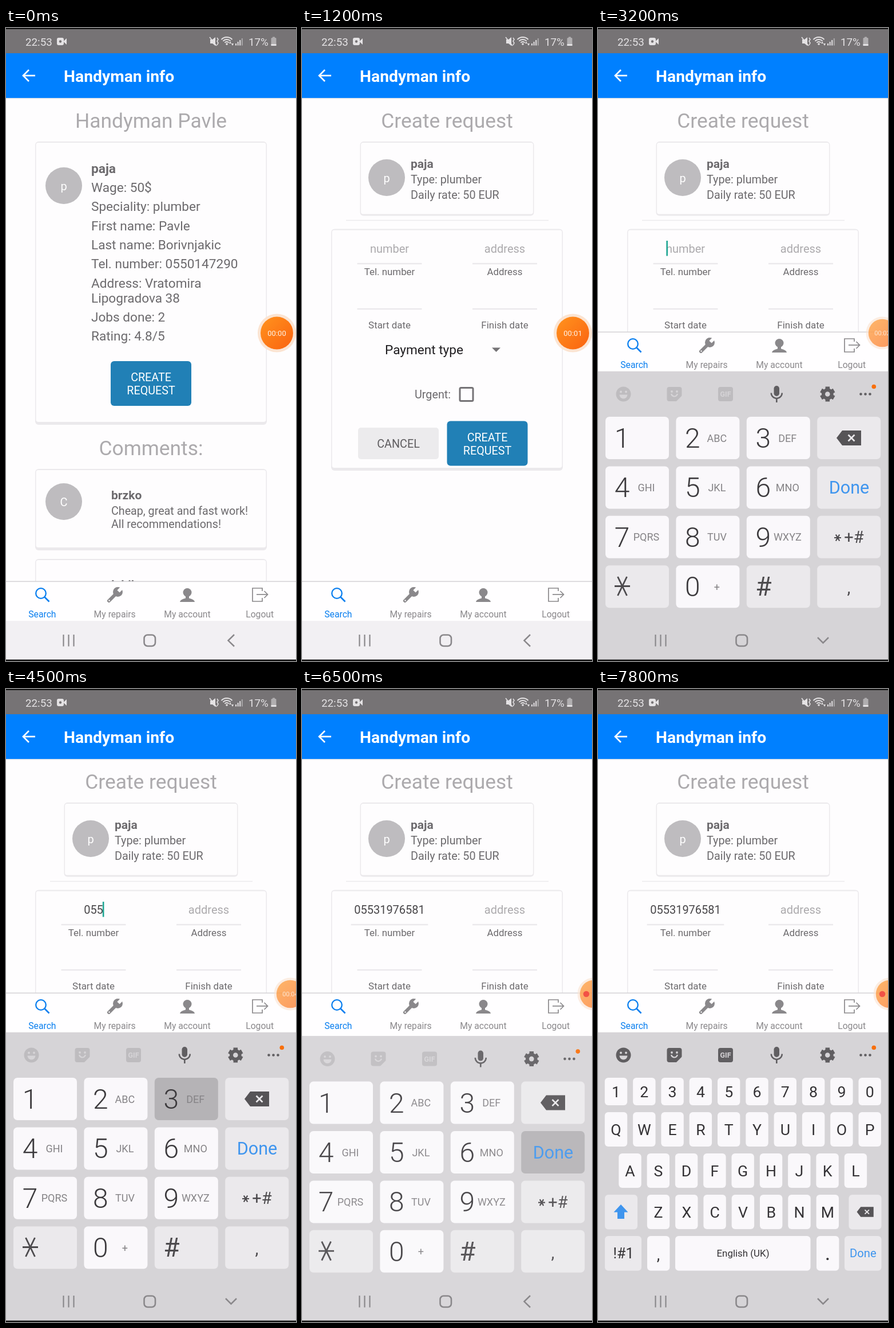
Animation of 507x1104 px, one loop 8000 ms. Source, as an HTML page with a canvas:

```html
<!DOCTYPE html>
<html lang="en">
<head>
<meta charset="utf-8">
<title>Handyman request</title>
<style>
html, body { margin: 0; width: 100%; height: 100%; overflow: hidden; background: #fefdfe; }
canvas { display: block; }
</style>
</head>
<body>
<canvas id="stage" width="507" height="1104"></canvas>
<script>
const ctx = document.getElementById('stage').getContext('2d');
const LOOP = 8000, PAGE = '#fefdfe', GREY = '#6c6a6d', PALE = '#acaaad', LINE = '#ebe9ec';
const ICON = '#8a888b', BLUE = '#0a7fef', KEYBG = '#d6d4d7', KEY = '#faf8fb', FKEY = '#ebe9ec', DOWN = '#b5b3b6';
const NUMBER = '05531976581';
// [press, release] for each digit of NUMBER
const PRESSES = [[3800, 3900], [4100, 4200], [4300, 4400], [4500, 4600], [4700, 4800], [5000, 5100],
  [5200, 5300], [5300, 5500], [5500, 5600], [5700, 5800], [5800, 5900]];
const TICKS = [1000, 2100, 3600, 4300, 5200, 5900];

const clamp = v => Math.max(0, Math.min(1, v));
const within = (t, a, b) => t >= a && t < b;

function text(s, x, y, size, color, align = 'left', weight = 400) {
  ctx.font = `${weight} ${size}px Roboto, sans-serif`;
  ctx.textAlign = align;
  ctx.fillStyle = color;
  ctx.fillText(s, x, y);
}
function rect(x, y, w, h, color) {
  ctx.fillStyle = color;
  ctx.fillRect(x, y, w, h);
}
function round(x, y, w, h, r, color) {
  ctx.beginPath();
  ctx.roundRect(x, y, w, h, r);
  ctx.fillStyle = color;
  ctx.fill();
}
function disc(x, y, r, color) {
  ctx.beginPath();
  ctx.arc(x, y, r, 0, Math.PI * 2);
  ctx.fillStyle = color;
  ctx.fill();
}
function arc(x, y, r, a, b, color, width) {
  ctx.beginPath();
  ctx.arc(x, y, r, a, b);
  ctx.strokeStyle = color;
  ctx.lineWidth = width;
  ctx.stroke();
}
function trace(p) {
  ctx.beginPath();
  for (let i = 0; i < p.length; i += 2) ctx.lineTo(p[i], p[i + 1]);
}
function line(p, color, width, cap = 'butt') {
  trace(p);
  ctx.strokeStyle = color;
  ctx.lineWidth = width;
  ctx.lineCap = cap;
  ctx.stroke();
  ctx.lineCap = 'butt';
}
function poly(p, color) {
  trace(p);
  ctx.fillStyle = color;
  ctx.fill();
}
function card(x, y, w, h, bottom = 5) {
  round(x, y, w, h, 6, LINE);
  round(x + 1.5, y + 2, w - 3, h - 2 - bottom, 4, PAGE);
}
function avatar(x, y, letter) {
  disc(x, y, 32, '#bebcbf');
  text(letter, x, y + 7.5, 20, '#fff', 'center');
}
function createButton(x, y, pressed) {
  round(x, y, 141, 78, 6, '#2180b6');
  if (pressed) round(x, y, 141, 78, 6, 'rgba(255,255,255,.2)');
  text('CREATE', x + 70.5, y + 35, 19.7, '#fff', 'center');
  text('REQUEST', x + 70.5, y + 58, 19.7, '#fff', 'center');
}

function statusBar() {
  const c = '#e4e2e4';
  rect(0, 0, 507, 44, '#767375');
  rect(0, 0, 507, 2, '#111');
  text('22:53', 34, 30.5, 18.8, c);
  round(89, 17, 12, 13, 3, c);
  poly([100, 23.5, 106, 18, 106, 29], c);
  disc(95, 23.5, 2.2, '#767375');
  poly([357, 20, 361, 20, 366, 16, 366, 31, 361, 27, 357, 27], c);
  line([356, 16, 368, 31], c, 1.6);
  line([369, 17, 371, 20, 369, 23, 371, 26, 369, 30], c, 1.5);
  for (const r of [5, 9, 13]) arc(386, 29, r, Math.PI * 1.24, Math.PI * 1.76, c, 1.8);
  disc(386, 28, 1.8, c);
  poly([390, 27, 392, 23.5, 394, 27], c);
  poly([394, 27, 398, 27, 396, 31], c);
  for (let i = 0; i < 4; i++) rect(401 + i * 3.6, 27 - i * 3, 2, 3.5 + i * 3, i < 3 ? c : '#aaa8aa');
  text('17%', 424, 30.5, 18.8, c);
  round(463.5, 17, 9, 14, 1.5, '#b0aeb0');
  rect(466, 15.5, 4, 2, '#b0aeb0');
  rect(463.5, 28, 9, 3, c);
}
function header() {
  rect(0, 43.5, 507, 78.5, '#0080ff');
  rect(0, 122, 507, 1.5, '#dfe3ea');
  line([51, 83, 30, 83], '#fff', 2.7);
  line([40, 73, 30, 83, 40, 93], '#fff', 2.7);
  text('Handyman info', 101, 94, 28.3, '#fff', 'left', 700);
}

function infoPage(t) {
  text('Handyman Pavle', 253.5, 174, 35.4, PALE, 'center');
  card(51, 198, 405, 494);
  avatar(101, 275, 'p');
  text('paja', 149, 253, 22.7, GREY, 'left', 700);
  const rows = ['Wage: 50$', 'Speciality: plumber', 'First name: Pavle', 'Last name: Borivnjakic',
    'Tel. number: 0550147290', 'Address: Vratomira', 'Lipogradova 38', 'Jobs done: 2', 'Rating: 4.8/5'];
  rows.forEach((s, i) => text(s, 149, 286 + i * 33.3 - (i > 5 ? 7 : 0), 22.6, GREY));
  createButton(183, 581, t >= 600);
  text('Comments:', 253.5, 745, 35.4, PALE, 'center');
  card(51, 769, 405, 142);
  avatar(101, 826, 'C');
  text('brzko', 184, 822, 21, GREY, 'left', 700);
  text('Cheap, great and fast work!', 184, 849, 19.7, GREY);
  text('All recommendations!', 184, 872, 19.7, GREY);
  card(51, 926, 405, 142);
  text('lubik', 184, 978, 21, GREY, 'left', 700);
}

function field(x, value, hint, label, cursor) {
  const size = 20;
  text(value || hint, x, 391.5, size, value ? '#474548' : PALE, 'center');
  const w = ctx.measureText(value || hint).width;
  const half = Math.max(113, value ? w + 11 : 0) / 2;
  line([x - half, 411, x + half, 411], LINE, 2.5);
  if (cursor) rect(value ? x + w / 2 - 1 : x - w / 2 + .5, 371, 2.6, 26.5, '#1fa794');
  text(label, x, 431, 16.9, GREY, 'center');
}
function formPage(t) {
  text('Create request', 253.5, 174, 35.4, PALE, 'center');
  card(101.5, 198, 304, 129.5, 3);
  avatar(148, 261, 'p');
  text('paja', 190, 244, 21, GREY, 'left', 700);
  text('Type: plumber', 190, 271, 19.8, GREY);
  text('Daily rate: 50 EUR', 190, 298, 19.8, GREY);
  line([77, 335.5, 431, 335.5], LINE, 1.6);
  card(51, 350.5, 405, 421.5);
  const typed = PRESSES.filter(p => t >= p[1]).length;
  const caret = within(t, 2200, 2700) || within(t, 3200, 6300);
  field(153, NUMBER.slice(0, typed), 'number', 'Tel. number', caret);
  field(354.5, '', 'address', 'Address', within(t, 7300, 7800));
  for (const [x, s] of [[153, 'Start date'], [354.5, 'Finish date']]) {
    line([x - 56.5, 490, x + 56.5, 490], LINE, 2.5);
    text(s, x, 524, 16.9, GREY, 'center');
  }
  text('Payment type', 145, 569, 22.6, '#1f1d20');
  poly([332, 557.5, 347, 557.5, 339.5, 565], '#757376');
  text('Urgent:', 197, 646, 19.8, GREY);
  ctx.strokeStyle = '#757376';
  ctx.lineWidth = 3;
  ctx.beginPath();
  ctx.roundRect(276, 627.5, 23, 23, 2);
  ctx.stroke();
  round(98, 697, 141, 55, 5, '#ecebed');
  text('CANCEL', 168.5, 732, 19.8, '#5e5c5f', 'center');
  createButton(253.5, 685.5, false);
}

function tabs(shift) {
  ctx.save();
  ctx.translate(0, -shift);
  rect(0, 965, 507, 69, '#fffeff');
  rect(0, 964.5, 507, 1.6, '#d6d4d7');
  arc(61, 986, 8.8, 0, 7, BLUE, 2.3);
  line([67.5, 992.5, 75.5, 1000.5], BLUE, 2.6);
  line([180, 999, 195, 984], ICON, 6, 'round');
  disc(195.5, 983.5, 8.5, ICON);
  line([196.5, 982.5, 206, 973], '#fffeff', 6);
  disc(180.5, 998.5, 1.2, '#fffeff');
  ctx.beginPath();
  ctx.ellipse(317, 984.5, 7.6, 9.5, 0, 0, 7);
  ctx.fill();
  ctx.beginPath();
  ctx.moveTo(304, 1001);
  ctx.quadraticCurveTo(304.5, 996.5, 314, 994.5);
  ctx.lineTo(314, 988);
  ctx.lineTo(320, 988);
  ctx.lineTo(320, 994.5);
  ctx.quadraticCurveTo(329.5, 996.5, 330, 1001);
  ctx.fillStyle = ICON;
  ctx.fill();
  disc(317, 984.5, 7.5, ICON);
  line([448, 982, 448, 977, 431, 977, 431, 1000, 448, 1000, 448, 994], ICON, 1.7);
  line([438, 988, 457, 988], ICON, 1.7);
  line([451.5, 982, 457.5, 988, 451.5, 994], ICON, 1.7);
  ['Search', 'My repairs', 'My account', 'Logout'].forEach((s, i) =>
    text(s, 63.4 + i * 126.75, 1027.5, 15.7, i ? ICON : BLUE, 'center'));
  ctx.restore();
}
function navIcons(chevron) {
  for (const x of [100.5, 109.5, 118.5]) line([x, 1058, x, 1078.5], ICON, 2.2);
  ctx.beginPath();
  ctx.roundRect(241.5, 1058.5, 19.5, 19.5, 6);
  ctx.lineWidth = 2.6;
  ctx.stroke();
  line(chevron ? [384, 1063, 393.5, 1072.5, 403, 1063] : [399, 1058, 388.5, 1068.3, 399, 1078.5], ICON, 2.5);
}

function backspace(x, y, s, bg) {
  const p = [-22, 0, -12, -13, 21, -13, 21, 13, -12, 13].map((v, i) => v * s + (i % 2 ? y : x));
  poly(p, '#565457');
  const d = 5.5 * s, cx = x + 4 * s;
  line([cx - d, y - d, cx + d, y + d], bg, 2.6 * s);
  line([cx - d, y + d, cx + d, y - d], bg, 2.6 * s);
}
function toolbar(full) {
  const dark = '#605e61', c = full ? dark : '#bebcbf', y = 638.5;
  disc(44.5, y, 13, c);
  disc(40, y - 4, 1.9, KEYBG);
  disc(49, y - 4, 1.9, KEYBG);
  ctx.beginPath();
  ctx.arc(44.5, y + 1, 7, 0, Math.PI);
  ctx.fillStyle = KEYBG;
  ctx.fill();
  round(120.5, 626, 26, 25, 4, c);
  disc(129, 634, 1.9, KEYBG);
  disc(138, 634, 1.9, KEYBG);
  arc(133.5, 637, 5.5, .2, Math.PI - .2, KEYBG, 2.2);
  poly([147, 641, 147, 652, 136, 652], KEYBG);
  poly([146, 641.5, 138, 641.5, 137, 650], c);
  round(210, 626, 26, 25, 4, c);
  text('GIF', 223, 643, 12.5, KEYBG, 'center', 700);
  round(307.5, 624, 9.5, 18, 4.7, dark);
  arc(312.3, 636.5, 9.5, 0, Math.PI, dark, 2.5);
  line([312.3, 646, 312.3, 653], dark, 2.6);
  for (let i = 0; i < 6; i++) {
    const a = Math.PI * (i / 3 + 1 / 6);
    line([401.3, y, 401.3 + 13 * Math.cos(a), y + 13 * Math.sin(a)], dark, 7.5);
  }
  disc(401.3, y, 10.3, dark);
  disc(401.3, y, 4.3, KEYBG);
  for (const x of [459.5, 467.5, 475.5]) disc(x, y, 2.3, dark);
  disc(482.3, 625.5, 3.8, '#f86f0a');
}
function numberPad(held) {
  const letters = ['', 'ABC', 'DEF', 'GHI', 'JKL', 'MNO', 'PQRS', 'TUV', 'WXYZ'];
  for (let r = 0; r < 4; r++) for (let c = 0; c < 4; c++) {
    const x = 13 + c * 123.4, y = 678 + r * 86.4;
    const label = c === 3 ? ['back', 'Done', '*+#', ','][r] : r === 3 ? '*0#'[c] : String(r * 3 + c + 1);
    const plain = c < 3 && (r < 3 || c === 1);
    const bg = held === label ? DOWN : plain ? KEY : FKEY;
    round(x, y, 111, 74, 7, bg);
    if (plain) {
      text(label, x + 29, y + 54, 48, '#3c3a3d', 'center', 300);
      text(label === '0' ? '+' : letters[r * 3 + c], x + 71.5, y + 43.5, 18, '#858386', 'center');
    }
  }
  backspace(439, 715, 1, FKEY);
  text('Done', 439, 812, 30.6, '#3f95ee', 'center');
  const ink = '#4c4a4d';
  line([419 - 6, 889, 419 + 6, 889], ink, 2.2);
  for (const s of [-1, 1]) line([419 - s * 3.2, 883.5, 419 + s * 3.2, 894.5], ink, 2.2);
  text('+#', 447.5, 898, 29, ink, 'center');
  text(',', 438.5, 986, 30, ink, 'center');
  line([29, 973.5, 56, 973.5], ink, 2.8);
  for (const s of [-1, 1]) line([42.5 - s * 8, 957, 42.5 + s * 8, 990], ink, 2.8);
  text('#', 289.5, 990, 46, ink, 'center');
}
function letterPad() {
  const ink = '#343235';
  const rows = [['1234567890', 31.5, 678, 48], ['QWERTYUIOP', 31.5, 738, 60], ['ASDFGHJKL', 56, 810, 60], ['ZXCVBNM', 105.5, 882, 60]];
  for (const [keys, x0, y, h] of rows) [...keys].forEach((k, i) => {
    const x = x0 + i * 49.3;
    round(x - 19.7, y, 39.4, h, 6, KEY);
    text(k, x, y + h / 2 + 9.5, 26.7, ink, 'center');
  });
  const wide = [[12, 882, 57, FKEY], [438.5, 882, 57, FKEY], [12, 954, 64, FKEY], [86, 954, 39.4, KEY],
    [135, 954, 236.5, KEY], [382, 954, 39.4, KEY], [431, 954, 64.5, FKEY]];
  for (const [x, y, w, c] of wide) round(x, y, w, 60.5, 6, c);
  poly([40, 899, 52.5, 912.5, 46, 912.5, 46, 924, 34, 924, 34, 912.5, 27.5, 912.5], '#3f95ee');
  backspace(467.5, 912, .68, FKEY);
  text('!#1', 44.5, 993, 25, ink, 'center');
  text(',', 105.5, 996, 28, ink, 'center');
  text('.', 401.5, 996, 30, ink, 'center', 500);
  text('English (UK)', 253.5, 990, 16.9, ink, 'center');
  text('Done', 463.3, 991, 20.2, '#3f95ee', 'center');
}
// hidden runs from 0 (fully up) to 1 (gone)
function keyboard(hidden, t) {
  const top = 598.5, off = 430 * Math.pow(hidden, 3.8);
  ctx.save();
  ctx.beginPath();
  ctx.rect(0, top, 507, 503);
  ctx.clip();
  ctx.translate(0, off);
  rect(0, top, 507, 510, KEYBG);
  toolbar(t > 7000);
  if (t > 7000) letterPad();
  else {
    const i = PRESSES.findIndex(p => within(t, p[0], p[1]));
    numberPad(within(t, 6300, 6700) ? 'Done' : NUMBER[i]);
  }
  rect(0, top, 507, 510, `rgba(255,255,255,${Math.pow(hidden, 2.4)})`);
  ctx.restore();
}

function badge(t) {
  const ease = p => 1 - Math.pow(1 - clamp(p), 3);
  const dock = ease((t - 1500) / 500), tuck = ease((t - 6200) / 300);
  ctx.save();
  ctx.translate(473.5 + 23.5 * dock + 13 * tuck, 532);
  ctx.scale(1 - .15 * dock, 1 - .15 * dock);
  ctx.globalAlpha = 1 - .38 * dock;
  disc(0, 0, 33.5, '#fbe4d2');
  const g = ctx.createLinearGradient(-20, -20, 20, 20);
  g.addColorStop(0, '#ff8c1c');
  g.addColorStop(1, '#fb6a12');
  disc(0, 0, 28.5, g);
  ctx.globalAlpha = 1 - .15 * dock;
  if (t < 6300) text('00:0' + TICKS.filter(k => t >= k).length, 0, 4.7, 13, '#fff3e8', 'center');
  ctx.restore();
  if (t >= 6300) disc(497, 532, 5.3, '#f25146');
}

function draw(t) {
  const first = within(t, 2500, 6700), open = first || t >= 7300;
  rect(0, 0, 507, 1104, PAGE);
  if (t < 1000) infoPage(t); else formPage(t);
  header();
  statusBar();
  if (open) rect(0, 590, 507, 445, '#fffeff');
  tabs(open ? 435 : 0);
  rect(0, 1034, 507, 70, '#f2f0f3');
  if (open) {
    const rise = clamp((t - (first ? 2400 : 7200)) / 400);
    const fall = first ? clamp((t - 6400) / 300) : 0;
    keyboard(Math.max(1 - rise, fall), t);
  }
  navIcons(within(t, 2400, 6400) || t >= 7200);
  rect(0, 1101.5, 507, 3, '#111');
  badge(t);
}

function tick() {
  draw(Math.floor(performance.now() % LOOP / 100) * 100);
  requestAnimationFrame(tick);
}
tick();
</script>
</body>
</html>
```
